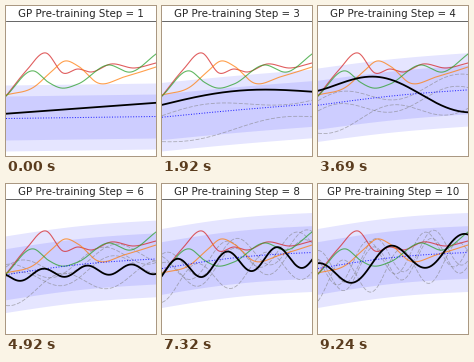
These frames come from a looping animation (150 by 150 pixels, 9270 ms). A matplotlib script:

```python
import numpy as np
import matplotlib.pyplot as plt
from matplotlib.animation import FuncAnimation

SIZE, FRAMES, INTERVAL, PER_STEP = 150, 309, 30, 31
x = np.linspace(0, SIZE, 301)
u = x / SIZE

# Turning points of the training functions
TRAINING = {
    'tab:red': [(0, 90), (20, 65), (40, 47), (57, 67), (72, 63), (85, 66),
                (105, 58), (128, 62), (150, 57)],
    'tab:orange': [(0, 89), (28, 81), (45, 66), (59, 55), (72, 60),
                   (92, 77), (118, 71), (150, 61)],
    'tab:green': [(0, 90), (28, 65), (42, 76), (55, 82), (72, 78),
                  (102, 59), (125, 66), (150, 48)]}

# Sample poses in band units: level, tilt, swing, waves, phase
POSES = {0: (0.28, 0.27, 0, 0, 0),
         64: (0.36, 0, 0.2, 0.5, 0),
         123: (0.15, -0.9, 0.32, 0.9, -0.7),
         164: (-0.17, -0.2, 0.13, 3.4, 2.58),
         199: (0.27, 1.1, 0.3, 1, 1.57),
         244: (-0.1, 0, 0.28, 3, -0.31),
         308: (-0.05, 0.35, 0.36, 2.05, 1.67)}

# Earlier samples: random level and phase
rng = np.random.default_rng(4)
EARLIER = list(zip((0.15, -0.6, -0.25, 0.1), rng.uniform(0, 2 * np.pi, 4)))


def spline(points):
    """Cubic Hermite curve through a few points."""
    px, py = np.array(points, float).T
    slope = np.gradient(py, px)
    i = np.clip(np.searchsorted(px, x, side='right') - 1, 0, len(px) - 2)
    w = px[i + 1] - px[i]
    f = (x - px[i]) / w
    ease = f * f * (3 - 2 * f)
    return ((1 - ease) * py[i] + ease * py[i + 1]
            + w * f * (1 - f) * ((1 - f) * slope[i] - f * slope[i + 1]))


def wave(level, tilt, swing, waves, phase):
    return level + tilt * (u - 0.5) + swing * np.sin(2 * np.pi * waves * u + phase)


def prior(n):
    """Mean and half width: the band rises, tilts, bends and widens."""
    t = min(n / 225, 1)
    s = t * t * (3 - 2 * t)
    tilt = 2 + 14 * (1 - np.exp(-n / 40))
    mean = 111.5 - 35 * s - tilt * (u - 0.5) - 3 * s * np.sin(np.pi * u)
    return mean, 33 + 6.5 * s


def sample(n):
    times = list(POSES)
    k = min(np.searchsorted(times, n, side='right') - 1, len(times) - 2)
    a, b = times[k], times[k + 1]
    f = (n - a) / (b - a)
    return (1 - f) * wave(*POSES[a]) + f * wave(*POSES[b])


def earlier(level, phase, n):
    t = n / FRAMES
    return wave(level * (1 - 0.5 * t), 0.2, 0.08 + 0.4 * t,
                0.4 + 2.2 * t, phase + 2 * t)


fig = plt.figure(figsize=(SIZE / 72, SIZE / 72), dpi=72, facecolor='white')
ax = fig.add_axes([0, 0, 1, 1])
training = {color: spline(points) for color, points in TRAINING.items()}


def draw(n):
    ax.clear()
    ax.set(xlim=(0, SIZE), ylim=(SIZE, 0))
    ax.axis('off')

    step = n // PER_STEP + 1
    mean, half = prior(n)
    for h in (half, half * 2 / 3):
        ax.fill_between(x, mean - h, mean + h, color='blue', alpha=0.1, lw=0)
    for level, phase in EARLIER[:step - 1]:
        ax.plot(x, mean - half * earlier(level, phase, n), color='gray',
                lw=0.8, ls=(0, (5, 2)), alpha=0.6)
    for color, y in training.items():
        ax.plot(x, y, color=color, lw=1.1, alpha=0.75)
    ax.plot(x, mean, color='blue', lw=1, ls=':', alpha=0.85)
    ax.plot(x, mean - half * sample(n), color='black', lw=1.8)

    ax.axhline(15, color='#444444', lw=0.8)
    ax.text(74.8, 11.3, f'GP Pre-training Step = {step}', ha='center',
            va='baseline', family='DejaVu Sans', size=10.2, color='#262626')


anim = FuncAnimation(fig, draw, frames=FRAMES, interval=INTERVAL,
                     init_func=lambda: None, repeat=True, repeat_delay=0)
plt.show()
```
